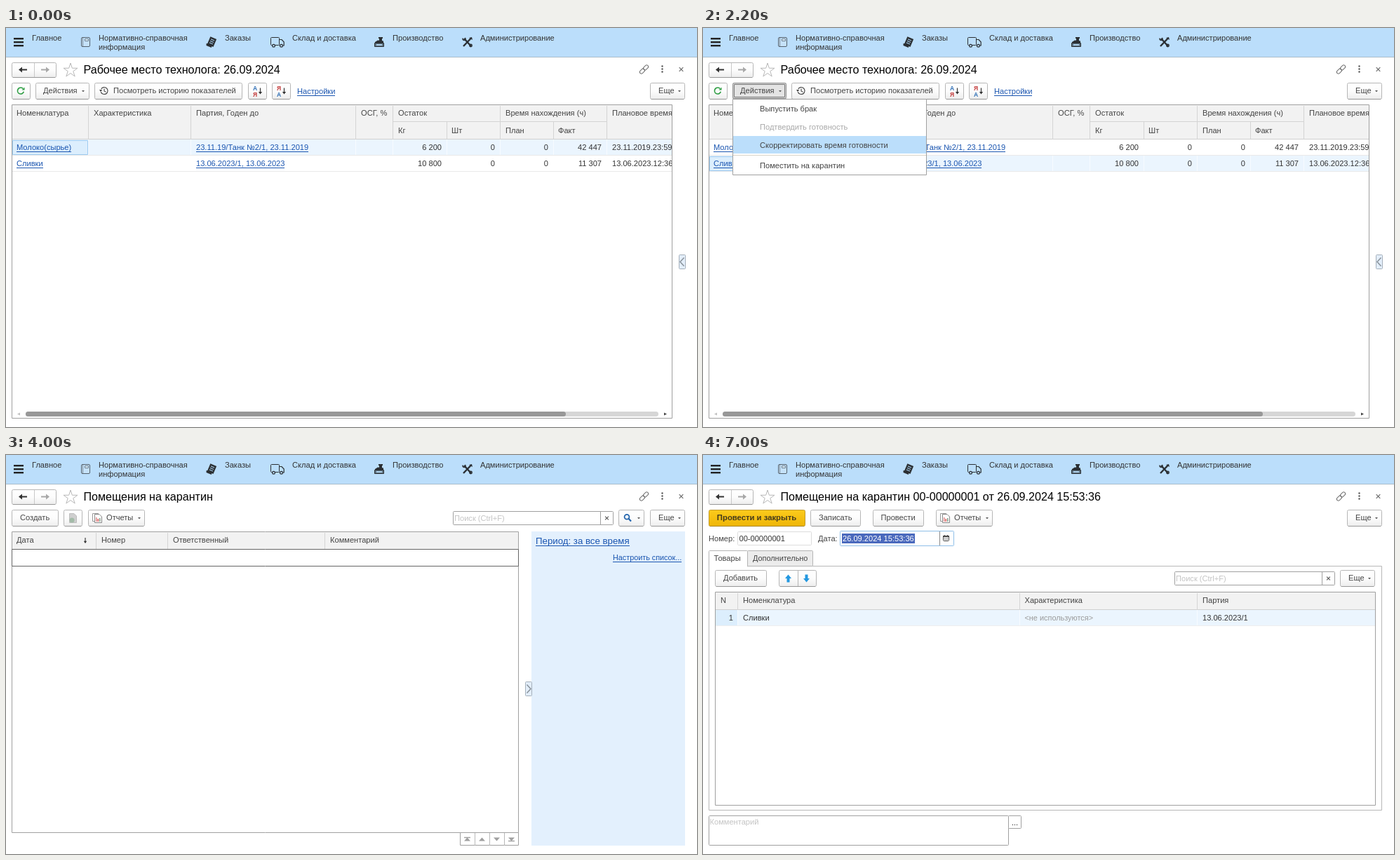
Animation of 985x569 px, one loop 8 s. Source, as an HTML page with a canvas:

```html
<!DOCTYPE html>
<html lang="ru">
<head>
<meta charset="utf-8">
<title>Карантин</title>
<style>
html, body { margin: 0; width: 100%; height: 100%; overflow: hidden; background: #fff; }
canvas { display: block; }
</style>
</head>
<body>
<canvas id="stage" width="985" height="569"></canvas>
<script>
const c = document.getElementById('stage').getContext('2d');
const LOOP = 8000;
const INK = '#444', DARK = '#2b2f33', LINK = '#1a55b0', LINE = '#d4d4d4', FRAME = '#a0a0a0';
const ROW = '#ebf5fe', CELL = '#dceefd', SKY = '#bbdefb';

// ---------- primitives ----------
function text(s, x, y, { color = INK, size = 11.1, align = 'left', bold = false, link = false } = {}) {
  c.font = `${bold ? 'bold ' : ''}${size}px "Liberation Sans", Arial, sans-serif`;
  c.textAlign = align;
  c.fillStyle = link ? LINK : color;
  c.fillText(s, x, y);
  if (link) rect(x, y + 2, Math.round(c.measureText(s).width), 1, LINK);
}
function rect(x, y, w, h, color) {
  c.fillStyle = color;
  c.fillRect(x, y, w, h);
}
function box(x, y, w, h, fill, border, r = 0) {
  c.beginPath();
  c.roundRect(x + .5, y + .5, w - 1, h - 1, r);
  if (fill) { c.fillStyle = fill; c.fill(); }
  c.strokeStyle = border;
  c.lineWidth = 1;
  c.stroke();
}
function path(points, { fill, stroke, width = 1, close = false } = {}) {
  c.beginPath();
  points.forEach(([x, y]) => c.lineTo(x, y));
  if (close || fill) c.closePath();
  if (fill) { c.fillStyle = fill; c.fill(); }
  if (stroke) { c.strokeStyle = stroke; c.lineWidth = width; c.stroke(); }
}
function ring(x, y, r, color, width = 1, from = 0, to = Math.PI * 2) {
  c.beginPath();
  c.arc(x, y, r, from, to);
  c.strokeStyle = color;
  c.lineWidth = width;
  c.stroke();
}
function dot(x, y, r, color) {
  c.beginPath();
  c.arc(x, y, r, 0, Math.PI * 2);
  c.fillStyle = color;
  c.fill();
}
function bar(x, y, w, h, color) {
  c.beginPath();
  c.roundRect(x, y, w, h, h / 2);
  c.fillStyle = color;
  c.fill();
}
function at(x, y, angle, draw) {
  c.save();
  c.translate(x, y);
  c.rotate(angle);
  draw();
  c.restore();
}
const vline = (x, y, h, color = LINE) => rect(x, y, 1, h, color);
const hline = (x, y, w, color = LINE) => rect(x, y, w, 1, color);
const caret = (x, y, color = '#555') => path([[x - 2, y - 1], [x + 2, y - 1], [x, y + 1.3]], { fill: color });
const cross = (x, y, r, color) => {
  path([[x - r, y - r], [x + r, y + r]], { stroke: color, width: 1.1 });
  path([[x - r, y + r], [x + r, y - r]], { stroke: color, width: 1.1 });
};
// Arrow pointing right, rotated by angle
function arrow(x, y, len, color, angle = 0, width = 2, head = 4) {
  at(x, y, angle, () => {
    rect(-len / 2, -width / 2, len - head + 1, width, color);
    path([[len / 2 - head - 1, -head], [len / 2, 0], [len / 2 - head - 1, head]], { fill: color });
  });
}

// ---------- widgets ----------
function button(x, y, w, h, label, labelX, arrowX) {
  const g = c.createLinearGradient(0, y, 0, y + h);
  g.addColorStop(0, '#fff');
  g.addColorStop(.5, '#fcfcfc');
  g.addColorStop(1, '#ececec');
  box(x, y, w, h, g, '#b6b6b6', 2);
  hline(x + 2, y + h - 1, w - 4, '#989898');
  if (label) text(label, labelX, y + 15);
  if (arrowX) caret(arrowX, y + 12);
}
const moreButton = (x, y) => button(x, y, 50, 24, 'Еще', x + 12, x + 42);

function search(x, y, w) {
  box(x, y, w, 20, '#fff', FRAME, 1);
  vline(x + w - 19, y, 20, FRAME);
  cross(x + w - 9.5, y + 10, 2.4, '#555');
  text('Поиск (Ctrl+F)', x + 2, y + 14, { color: '#c4c4c4' });
}
function reports(x) {
  button(x, 78, 81, 24, 'Отчеты', x + 26, x + 73);
  box(x + 6, 83, 9, 12, '#fff', '#999');
  path([[x + 9.5, 84.5], [x + 16, 84.5], [x + 19.5, 88], [x + 19.5, 96.5], [x + 9.5, 96.5]], { fill: '#fff', stroke: '#888' });
  rect(x + 11, 89, 1.5, 6, '#d88');
  rect(x + 13.5, 91, 1.5, 4, '#d55');
  rect(x + 16, 90, 1.5, 5, '#7a9b86');
}
function handle(x, dir) {
  box(x, 323, 10, 21, '#e3eefa', '#a5b0bb', 1);
  path([[x + 5 - 2.5 * dir, 327.5], [x + 5 + 3 * dir, 333.5], [x + 5 - 2.5 * dir, 339.5]], { stroke: '#8a939b', width: 1.5 });
}
function header(x, y, w, h, columns) {
  rect(x, y, w, h, '#f2f2f2');
  hline(x, y + h - 1, w, '#d0d0d0');
  columns.forEach(cx => vline(cx, y + 1, h - 1));
}
function selectedRow(x, y, w, columns) {
  rect(x, y, w, 22, ROW);
  columns.forEach(cx => vline(cx, y, 22, '#f7fbff'));
}
const selectedCell = (x, y, w) => box(x, y, w, 21, CELL, '#9ccaf0');

// ---------- top bar ----------
function navIcons() {
  [14, 19, 24].forEach(y => rect(11, y, 14, 2.4, '#222'));
  // Ledger
  box(107, 13, 13, 14, '#c5e2fa', '#55616c', 1.5);
  vline(109, 14, 12, '#7b8a96');
  box(112, 15, 6, 4, '#d9ecfb', '#6d7f8e');
  // Order book
  at(293, 20, .4, () => {
    path([[-4.5, -6.5], [5, -6.5], [5, 5.5], [-4.5, 5.5]], { fill: DARK });
    [-4, -1.3, 1.4].forEach(y => rect(-2.5, y, 5.5, 1.2, '#9bbdd8'));
    path([[-6, 4.5], [2.5, 4.5], [3, 7.5], [-5, 7.5]], { fill: DARK });
  });
  // Truck
  box(377, 13, 13, 12, null, DARK, 1);
  path([[389.5, 16.5], [393, 16.5], [396.2, 20], [396.2, 25], [389.5, 25]], { stroke: DARK, width: 1.2 });
  [381.5, 392.5].forEach(x => { dot(x, 25.3, 2.5, DARK); dot(x, 25.3, 1.2, SKY); });
  // Factory
  rect(531, 13, 6, 2, DARK);
  rect(532, 15, 4, 4, DARK);
  path([[526, 20], [530, 17.5], [538, 18.5], [538, 21], [526, 21]], { fill: DARK });
  box(525, 21, 14, 6, '#5f7382', DARK);
  rect(528, 23, 8, 2, '#a9cbe5');
  // Tools
  path([[653, 15], [663, 26]], { stroke: DARK, width: 2.4 });
  path([[662.5, 15], [652, 26]], { stroke: DARK, width: 2.4 });
  ring(653, 15.5, 1.9, DARK, 1.6, -.8, 3.6);
  ring(662.5, 25, 1.7, DARK, 1.5);
  path([[660, 14], [664, 13], [665, 17]], { fill: DARK });
}
function topBar() {
  rect(0, 0, 985, 41, SKY);
  hline(0, 41, 985, '#a9bccb');
  navIcons();
  [['Главное', 37], ['Нормативно-справочная', 132], ['Заказы', 312], ['Склад и доставка', 408],
   ['Производство', 551], ['Администрирование', 676]].forEach(([s, x]) => text(s, x, 18, { color: '#333' }));
  text('информация', 132, 31, { color: '#333' });
}
function titleBar(title) {
  button(8, 49, 64, 22);
  vline(40, 50, 20, '#c8c8c8');
  arrow(24, 59.5, 12, '#333', Math.PI);
  arrow(56, 59.5, 12, '#a8a8a8');
  const star = Array.from({ length: 10 }, (_, i) => {
    const a = -Math.PI / 2 + i * Math.PI / 5, r = i % 2 ? 4 : 10.5;
    return [92 + r * Math.cos(a), 60.5 + r * Math.sin(a)];
  });
  path(star, { stroke: '#b8b8b8', close: true });
  text(title, 110.5, 65, { size: 16.1, color: '#000' });
  [-2.6, 2.6].forEach(d => at(909.5 + d, 59 - d, -Math.PI / 4, () => {
    c.beginPath();
    c.roundRect(-4, -2.4, 8, 4.8, 2.4);
    c.strokeStyle = '#777';
    c.lineWidth = 1.1;
    c.stroke();
  }));
  [54.5, 58.5, 62.5].forEach(y => dot(935.5, y, 1.2, '#555'));
  cross(962.5, 59, 2.8, '#666');
}

// ---------- workplace screen ----------
function sortButton(x, top, bottom) {
  const tint = s => s === 'А' ? '#2f6fb5' : '#c43c3c';
  button(x, 78, 27, 24);
  text(top, x + 7, 88.5, { size: 8.5, bold: true, color: tint(top) });
  text(bottom, x + 7, 97.5, { size: 8.5, bold: true, color: tint(bottom) });
  arrow(x + 17.5, 90, 9, '#333', Math.PI / 2, 1.2, 2.6);
}
function biohazard(x, y) {
  for (let i = 0; i < 3; i++) {
    const a = -Math.PI / 2 + i * Math.PI * 2 / 3;
    ring(x + 3.2 * Math.cos(a), y + 3.2 * Math.sin(a), 2.6, '#222', 1.9, a + .6, a + Math.PI * 2 - .6);
  }
  ring(x, y, 3, '#222', 1);
}
function actionsButton(t) {
  button(42, 78, 77, 24, 'Действия', 53, 110);
  if (t < 1600 || t >= 3200) return;
  box(42, 78, 77, 23, '#d9d9d9', '#8c8c8c', 2);
  box(44, 80, 73, 19, '#e4e4e4', '#777');
  text('Действия', 53, 93);
  caret(110, 90);
}
function menu(t) {
  const items = [['Выпустить брак', 102], ['Подтвердить готовность', 128],
                 ['Скорректировать время готовности', 154], ['Поместить на карантин', 183]];
  const hover = t < 2200 ? 0 : t < 2400 ? 2 : t < 2600 ? -1 : 3;
  box(42, 101, 277, 109, '#fff', '#a0a0a0');
  hline(43, 181, 275, '#d9d4c8');
  items.forEach(([label, y], i) => {
    if (i === hover) rect(43, y, 275, i === 3 ? 26 : 25, SKY);
    text(label, 81, y + 17, { color: i === 1 ? '#a8a8a8' : INK });
  });
}
function workplace(t) {
  const current = t < 1200 ? 0 : 1, quarantined = t >= 3200;
  const columns = [117, 263, 498, 551, 704, 856];
  titleBar('Рабочее место технолога: 26.09.2024');
  button(8, 78, 27, 24);
  ring(21, 89.5, 4.5, '#2f9e44', 1.7, .3, 5.5);
  path([[22.5, 88.5], [26.5, 88.5], [26.5, 84.5]], { fill: '#2f9e44' });
  actionsButton(t);
  button(126, 78, 211, 24, 'Посмотреть историю показателей', 153, 0);
  ring(140, 89.5, 5, '#444', 1.2, -2.6, 2.8);
  path([[140, 86.5], [140, 90], [142.5, 91.2]], { stroke: '#444', width: 1.1 });
  path([[133, 88], [137.2, 88], [135, 91]], { fill: '#444' });
  sortButton(345, 'А', 'Я');
  sortButton(379, 'Я', 'А');
  text('Настройки', 415, 94, { link: true });
  moreButton(918, 78);

  c.save();
  c.beginPath();
  c.rect(8, 109, 941, 448);
  c.clip();
  header(9, 110, 941, 49, columns);
  hline(552, 133, 304);
  [628, 780].forEach(x => vline(x, 134, 24));
  [['Номенклатура', 15], ['Характеристика', 125], ['Партия, Годен до', 271], ['ОСГ, %', 506], ['Остаток', 559],
   ['Время нахождения (ч)', 712], ['Плановое время', 864]].forEach(([s, x]) => text(s, x, 125));
  [['Кг', 559], ['Шт', 635], ['План', 712], ['Факт', 787]].forEach(([s, x]) => text(s, x, 150));
  const rows = [
    ['Молоко(сырье)', '23.11.19/Танк №2/1, 23.11.2019', '6 200', '42 447', '23.11.2019.23:59'],
    ['Сливки', '13.06.2023/1, 13.06.2023', '10 800', '11 307', '13.06.2023.12:36'],
  ];
  rows.forEach(([name, batch, kg, fact, planned], i) => {
    const y = 159 + i * 23, base = y + 15, marked = quarantined && i === 1;
    if (i === current) {
      selectedRow(9, y, 941, [...columns, 628, 780]);
      selectedCell(9, y + 1, 108);
    }
    hline(9, y + 22, 941, '#e9e9e9');
    text(name, 15, base, { link: true });
    if (marked) biohazard(278, y + 12);
    text(batch, marked ? 292 : 271, base, { link: true });
    [[kg, 621], ['0', 697], ['0', 773], [fact, 849]].forEach(([s, x]) => text(s, x, base, { align: 'right', color: '#333' }));
    text(planned, 864, base, { color: '#333' });
  });
  c.restore();

  box(8, 109, 942, 448, null, FRAME);
  bar(28, 547, 902, 7, '#d6d6d6');
  bar(28, 547, 770, 7, '#989898');
  path([[16, 550.5], [20, 548.5], [20, 552.5]], { fill: '#c0c0c0' });
  path([[942, 550.5], [938, 548.5], [938, 552.5]], { fill: '#444' });
  handle(959, -1);
  if (t >= 1800 && t < 2800) menu(t);
}

// ---------- journal screen ----------
function copyIcon(active) {
  button(82, 78, 27, 24);
  path([[90.5, 83.5], [97, 83.5], [100.5, 87], [100.5, 96.5], [90.5, 96.5]],
    { fill: active ? '#fff' : '#cfcfcf', stroke: active ? '#888' : '#bdbdbd' });
  dot(94, 93, 3.5, active ? '#2f9e44' : '#a3bba8');
  if (active) {
    rect(92, 92.4, 4, 1.2, '#fff');
    rect(93.4, 91, 1.2, 4, '#fff');
  }
}
function pager() {
  box(647, 538, 84, 19, '#fff', FRAME);
  [668, 689, 710].forEach(x => vline(x, 539, 18, '#b8b8b8'));
  [657.5, 678.5, 699.5, 720.5].forEach((x, i) => {
    const d = i < 2 ? -1 : 1;
    path([[x - 4.5, 548 - 2.5 * d], [x + 4.5, 548 - 2.5 * d], [x, 548 + 2.5 * d]], { fill: '#a0a0a0' });
    if (i % 3 === 0) rect(x - 4.5, 547.3 + 2.5 * d, 9, 1.4, '#a0a0a0');
  });
}
function journal(t) {
  const filled = t >= 5400, settled = t >= 6600, columns = [128, 230, 454];
  titleBar('Помещения на карантин');
  button(8, 78, 67, 24, 'Создать', 20, 0);
  copyIcon(settled);
  reports(117);
  search(637, 80, 229);
  button(873, 78, 37, 24, '', 0, 902);
  ring(885, 88.2, 3.4, '#2465ad', 1.8);
  path([[887.5, 90.8], [891, 94.5]], { stroke: '#2465ad', width: 2.2 });
  moreButton(918, 78);

  header(9, 110, 721, 25, columns);
  [['Дата', 15], ['Номер', 136], ['Ответственный', 238], ['Комментарий', 462]].forEach(([s, x]) => text(s, x, 125));
  arrow(113, 122, 8, '#333', Math.PI / 2, 1.1, 2.2);
  box(8, 109, 723, 430, null, FRAME);
  if (filled) {
    selectedRow(9, 135, 721, columns);
    hline(9, 157, 721, '#e9e9e9');
    if (settled) selectedCell(129, 135, 101);
    box(16, 141, 12, 9, '#fff', '#8f9ba5');
    [143, 145, 147].forEach(y => hline(18, y, 8, '#a9b5bd'));
    path([[21, 148], [24, 151], [29, 146]], { stroke: '#2f9e44', width: 2.2 });
    text('15:53', 36.5, 150, { color: '#333' });
    text('00-00000001', 135.5, 150, { color: '#333' });
    text('Администратор', 237.5, 150, { color: '#333' });
  } else {
    box(8, 134, 723, 25, '#fff', '#666');
  }
  pager();
  rect(749, 109, 219, 448, '#e3f0fd');
  handle(740, 1);
  text('Период: за все время', 755, 127, { size: 13.25, link: true });
  text('Настроить список...', 865, 150, { size: 10.8, link: true });
}

// ---------- document screen ----------
function documentForm() {
  const columns = [49, 451, 704];
  titleBar('Помещение на карантин 00-00000001 от 26.09.2024 15:53:36');
  const gold = c.createLinearGradient(0, 78, 0, 102);
  gold.addColorStop(0, '#fccb1c');
  gold.addColorStop(1, '#eeb506');
  box(8, 78, 138, 24, gold, '#c09a2c', 2);
  hline(10, 101, 134, '#a98519');
  text('Провести и закрыть', 76.5, 93, { bold: true, size: 11.3, align: 'center', color: '#443a1c' });
  button(153, 78, 72, 24, 'Записать', 165, 0);
  button(242, 78, 73, 24, 'Провести', 253.5, 0);
  reports(332);
  moreButton(918, 78);

  text('Номер:', 8, 123);
  box(49, 109, 106, 20, '#fff', '#dcdcdc', 1);
  text('00-00000001', 51.5, 123, { color: '#333' });
  text('Дата:', 164, 123);
  box(195, 108, 163, 22, '#fff', '#8fbfe8', 1);
  rect(198, 112, 104, 14, '#4a69bd');
  text('26.09.2024 15:53:36', 199, 123, { color: '#fff' });
  vline(337, 109, 20, '#888');
  box(342, 115, 9, 8, '#fff', '#444', 1);
  rect(342, 115, 9, 2, '#444');
  [118, 120].forEach(y => [344, 346, 348].forEach(x => rect(x, y, 1, 1, '#444')));
  [344, 348].forEach(x => rect(x, 114, 1, 2, '#444'));

  box(8, 158, 960, 349, '#fff', '#b8b8b8');
  box(63, 136, 94, 23, '#ececec', '#b4b4b4', 1);
  box(8, 136, 56, 24, '#fff', '#b4b4b4', 1);
  rect(9, 158, 54, 3, '#fff');
  vline(8, 157, 5, '#b8b8b8');
  text('Товары', 15.5, 151);
  text('Дополнительно', 71, 151, { size: 10.9 });

  button(17, 164, 74, 24, 'Добавить', 29, 0);
  button(108, 164, 54, 24);
  vline(135, 165, 22, '#b6b6b6');
  arrow(121.5, 176, 11, '#2398e0', -Math.PI / 2, 4, 4.5);
  arrow(147.5, 176, 11, '#2398e0', Math.PI / 2, 4, 4.5);
  search(672, 166, 229);
  moreButton(908, 164);

  header(18, 196, 940, 25, columns);
  [['N', 25], ['Номенклатура', 57], ['Характеристика', 458.5], ['Партия', 712]].forEach(([s, x]) => text(s, x, 211));
  selectedRow(18, 221, 940, columns);
  rect(18, 221, 31, 22, CELL);
  hline(18, 243, 940, '#eeeeee');
  text('1', 43, 236, { align: 'right', color: '#333' });
  text('Сливки', 57, 236, { color: '#333' });
  text('<не используются>', 458.5, 236, { color: '#9a9a9a', size: 10.9 });
  text('13.06.2023/1', 712, 236, { color: '#333' });
  box(17, 195, 942, 305, null, FRAME);

  box(8, 514, 428, 43, '#fff', FRAME, 1);
  text('Комментарий', 9.5, 527, { color: '#c4c4c4' });
  box(435, 514, 19, 19, '#fff', FRAME, 1);
  text('...', 444.5, 528, { align: 'center', color: '#222' });
}

function frame(now) {
  const t = now % LOOP;
  rect(0, 0, 985, 569, '#fff');
  topBar();
  if (t < 4000) workplace(t);
  else if (t < 7000) journal(t);
  else documentForm();
  requestAnimationFrame(frame);
}
frame(0);
</script>
</body>
</html>
```
